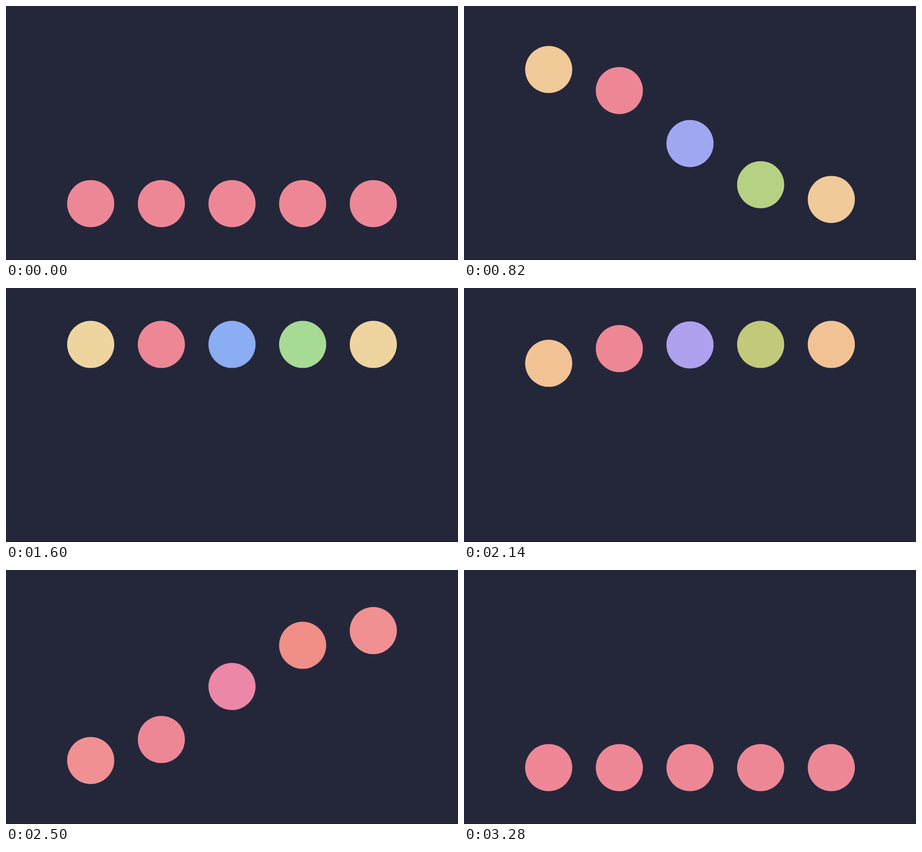
Animation of 998 by 561 pixels, one loop 3400 ms. Source, as an HTML page:

```html
<!DOCTYPE html>
<html lang="en">
<head>
<meta charset="utf-8">
<title>Five circles</title>
<style>
  html, body { margin: 0; width: 100%; height: 100%; overflow: hidden; background: #24273a; }
  svg { display: block; width: 998px; height: 561px; }
</style>
</head>
<body>
<svg id="stage" viewBox="0 0 998 561">
  <rect y="560" width="998" height="1" fill="#14151f"/>
</svg>
<script>
  const LOOP = 3400, PHASE = 1680, MOVE = 1200, STAGGER = 120;
  const LOW = 436.4, HIGH = 124.6;
  const REST = '#ed8796';
  const COLORS = ['#eed49f', REST, '#8aadf4', '#a6da95', '#eed49f'];

  const stage = document.getElementById('stage');
  const circles = COLORS.map((color, i) => {
    const c = document.createElementNS('http://www.w3.org/2000/svg', 'circle');
    c.setAttribute('cx', 187 + 156 * i);
    c.setAttribute('r', 52);
    return stage.appendChild(c);
  });

  const clamp = x => Math.min(1, Math.max(0, x));
  const easeInOut = (x, power) =>
    x < 0.5 ? (2 * x) ** power / 2 : 1 - (2 - 2 * x) ** power / 2;

  // Rises from 0 to 1 in the first phase and returns to 0 in the second.
  function swing(t, delay, power) {
    const part = from => easeInOut(clamp((t - from - delay) / MOVE), power);
    return part(0) - part(PHASE);
  }

  function draw(t) {
    // Positions are staggered, colours change together around the hue circle.
    const tint = (clamp(swing(t, 0, 3)) * 100).toFixed(3);
    circles.forEach((c, i) => {
      c.setAttribute('cy', LOW + (HIGH - LOW) * swing(t, i * STAGGER, 5));
      c.style.fill = `color-mix(in lch, ${COLORS[i]} ${tint}%, ${REST})`;
    });
  }

  const start = performance.now();
  function tick() {
    draw((performance.now() - start) % LOOP);
    requestAnimationFrame(tick);
  }
  tick();
</script>
</body>
</html>
```
